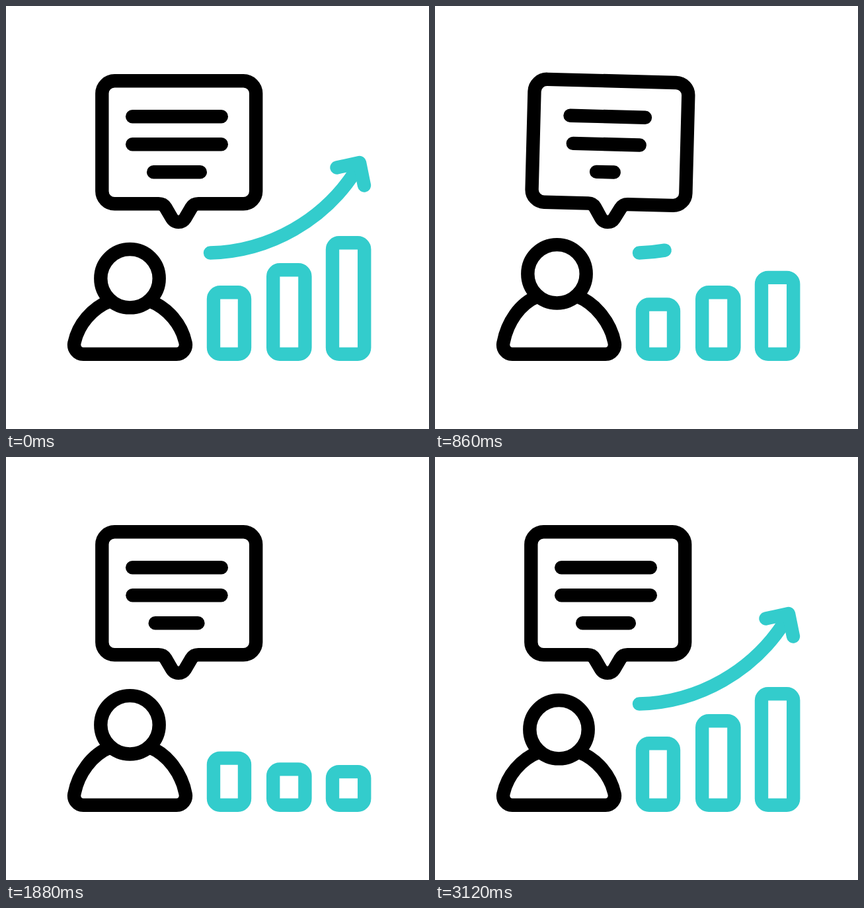
These frames come from a looping animation (640 px wide and 640 px high, 3.36 s). An HTML page:

```html
<!DOCTYPE html>
<html lang="en">
<head>
<meta charset="utf-8">
<title>Growth talk</title>
<style>
  html, body { margin: 0; width: 100%; height: 100%; overflow: hidden; background: #fff; }
  svg { display: block; width: 100vw; height: 100vh; }
  path, rect, circle { fill: none; stroke-width: 20.4; }
  .ink { stroke: #000; }
  .teal { stroke: #33cccc; }
  .round { stroke-linecap: round; stroke-linejoin: round; }
</style>
</head>
<body>
<svg viewBox="0 0 640 640">
  <g id="bubble" class="ink round">
    <path d="M164.3 113.3H359.2A19 19 0 0 1 378.2 132.3V280.3A19 19 0 0 1 359.2 299.3H291
      C286 299.3 283 301 280.5 305L270.8 321.5C266.5 328.5 255.5 328.5 251.2 321.5L241.5 305
      C239 301 236 299.3 231 299.3H164.3A19 19 0 0 1 145.3 280.3V132.3A19 19 0 0 1 164.3 113.3Z"/>
    <path class="line"/>
    <path class="line"/>
    <path class="line"/>
  </g>
  <path id="body" class="ink"/>
  <circle id="head" class="ink" r="44.2"/>
  <g class="teal">
    <rect class="bar" x="314" width="47" rx="10"/>
    <rect class="bar" x="404.2" width="48.2" rx="10"/>
    <rect class="bar" x="494" width="48.2" rx="10"/>
  </g>
  <g class="teal round">
    <path id="shaft" pathLength="1" d="M309 373.5A270 270 0 0 0 530.5 247"/>
    <path id="tip"/>
  </g>
</svg>
<script>
const LOOP = 3360, STEP = 20;
const $ = id => document.getElementById(id);
const all = sel => [...document.querySelectorAll(sel)];
const lines = all('.line'), bars = all('.bar');

const wave = x => (1 - Math.cos(Math.PI * x)) / 2;
const ease = (t, a, b) => wave(Math.min(1, Math.max(0, (t - a) / (b - a))));

// Eased value from a table of [time, value] steps
function track(t, steps) {
  let v = steps[0][1];
  for (let i = 1; i < steps.length; i++) {
    v += (steps[i][1] - steps[i - 1][1]) * ease(t, steps[i - 1][0], steps[i][0]);
  }
  return v;
}

const TILT = [[240, 0], [600, -2.35], [960, 2.35], [1320, -2.35], [1680, 0]];
const LINES = [[191.2, 325.8, 167.3], [191.2, 325.8, 209.3], [223.2, 293.8, 251.3]];
const BARS = [[423, 480], [389, 479], [348, 477]];
const BASE = 526.7;

function drawBubble(t) {
  $('bubble').setAttribute('transform', `rotate(${track(t, TILT)} 261 327)`);
  LINES.forEach(([a, b, y], i) => {
    const u = (t - 240 - 65 * i) / 800;
    const cut = u > 0 && u < 2 ? 50 * wave(2 * u) : 0;
    lines[i].setAttribute('d', `M${a + cut * 0.43} ${y}H${b - cut * 0.57}`);
  });
}

function drawPerson(t) {
  const dy = -6.9 * (ease(t, 240, 690) - ease(t, 2460, 3120));
  const u = (t - 570) / 1200;
  const dx = u > 0 && u < 1 ? -3 * Math.sin(2 * Math.PI * u) : 0;
  $('head').setAttribute('cx', 187.5 + dx);
  $('head').setAttribute('cy', 412.2 + dy);
  const top = (x, y) => `${x + dx * 0.7} ${y + dy}`;
  const mid = (x, y) => `${x} ${y + dy * 0.4}`;
  $('body').setAttribute('d',
    `M${top(158, 446)}C${top(130, 457)} ${mid(109, 482)} 103.3 510` +
    `C101.8 518.5 108 526.7 117 526.7H258C267 526.7 273.2 518.5 271.7 510` +
    `C${mid(266, 482)} ${top(245, 457)} ${top(217, 446)}`);
}

function drawBars(t) {
  BARS.forEach(([high, low], i) => {
    const y = 10.2 + track(t, [
      [240, high], [540, high - 16.8], [1200, low], [1590, low], [2100 + 510 * i, high]
    ]);
    bars[i].setAttribute('y', y);
    bars[i].setAttribute('height', BASE - y);
  });
}

function drawArrow(t) {
  const shaft = 1 - ease(t, 620, 940) + ease(t, 2100, 2660);
  const tip = 1 - ease(t, 580, 680) + ease(t, 2680, 2900);
  $('shaft').setAttribute('stroke-dasharray', `${shaft} 2`);
  $('shaft').style.display = shaft > 0.001 ? '' : 'none';
  $('tip').setAttribute('d',
    `M${535 - 34.5 * tip} ${237 + 7.5 * tip}L535 237L${535 + 7 * tip} ${237 + 34.5 * tip}`);
  $('tip').style.display = tip > 0.001 ? '' : 'none';
}

const start = performance.now();
function frame() {
  const t = Math.floor(((performance.now() - start) % LOOP) / STEP) * STEP;
  drawBubble(t);
  drawPerson(t);
  drawBars(t);
  drawArrow(t);
  requestAnimationFrame(frame);
}
frame();
</script>
</body>
</html>
```
